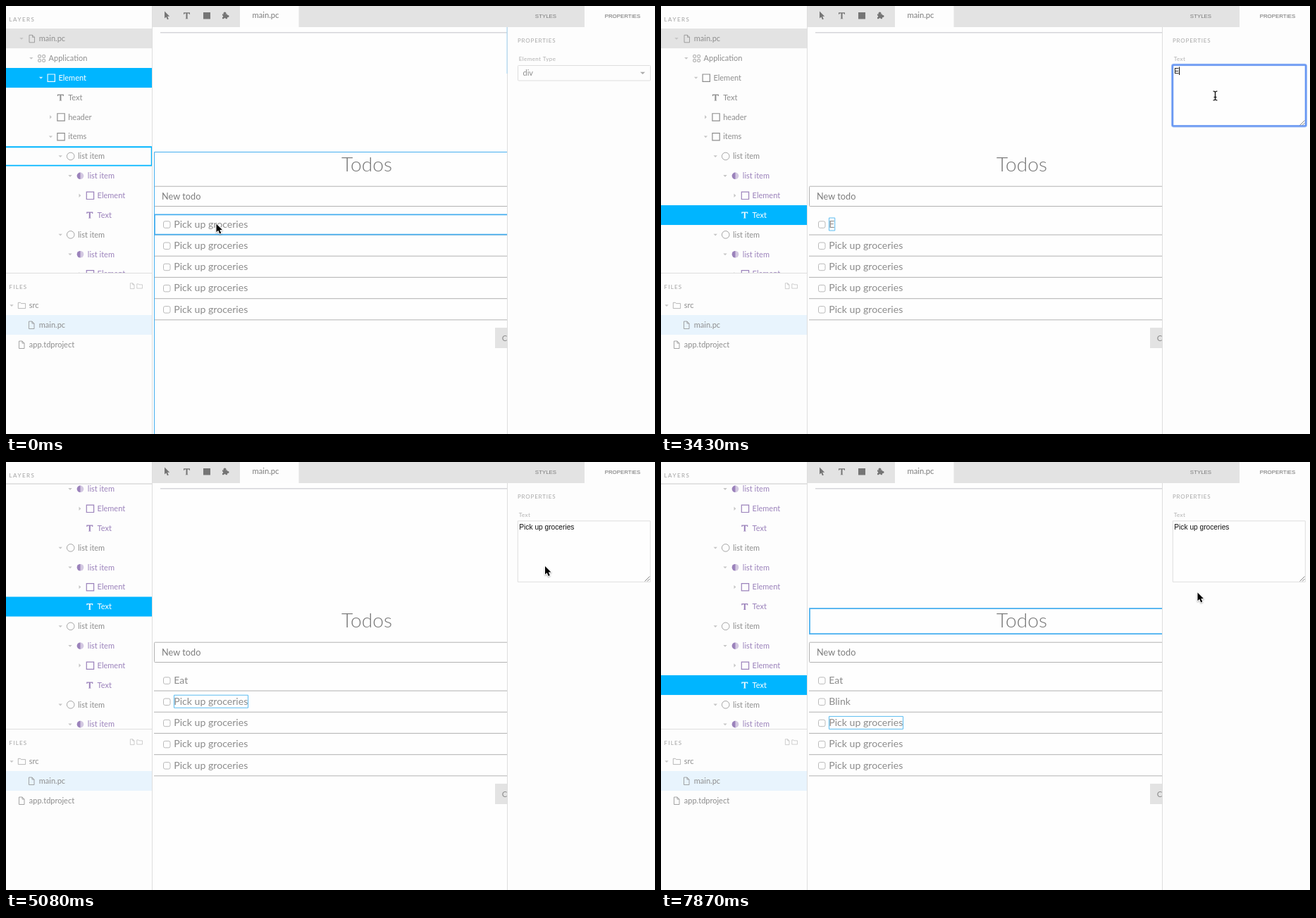
Animation of 921x608 px, one loop 8 s. Source, as an HTML page with a canvas:

```html
<!DOCTYPE html>
<html lang="en">
<head>
<meta charset="utf-8">
<title>Todo editor</title>
<style>
html, body { margin: 0; width: 100%; height: 100%; overflow: hidden; background: #fefefe; }
canvas { display: block; }
</style>
</head>
<body>
<canvas id="stage" width="921" height="608"></canvas>
<script>
const ctx = document.getElementById('stage').getContext('2d');
const LOOP = 8000, SPLIT = 711, PITCH = 27.86, ITEM = 30.2;
const GREY = '#8e8e8e', PURPLE = '#9b82bb', PALE = '#c6c6c6', RULE = '#dedede';
const BAR = '#e3e3e3', BLUE = '#00b5ff', HOVER = '#45aeef', PAPER = '#fdfdfd';
const TODO = 'Pick up groceries';

// Each step changes some of the state; sel -1 is the whole element, hover is an item index or a name.
const steps = [
  [0, { sel: -1, hover: 0, x: 298.5, y: 309.5, beam: 0, edge: 1, focus: 0, mark: -1, caret: 0, scroll: 0, todos: [TODO, TODO] }],
  [620, { edge: 0 }],
  [980, { sel: 0 }],
  [1250, { x: 309, y: 303.5 }],
  [1400, { x: 350, y: 285, hover: null }],
  [1510, { x: 480, y: 230, hover: 'title' }],
  [1620, { x: 640, y: 172 }],
  [1720, { x: 762, y: 133, hover: null }],
  [1830, { x: 786.5, y: 127.5, beam: 1, focus: 1 }],
  [2030, { mark: 8 }],
  [2150, { mark: 0 }],
  [3430, { mark: -1, caret: 1, todos: ['E', TODO] }],
  [3610, { todos: ['Ea', TODO] }],
  [3720, { todos: ['Eat', TODO] }],
  [3840, { x: 420, y: 285, beam: 0 }],
  [3960, { x: 230, y: 346.5, hover: 1 }],
  [4080, { x: 242, y: 345 }],
  [4200, { x: 250, y: 343, caret: 0 }],
  [4310, { x: 254, y: 341 }],
  [4400, { sel: 1, focus: 0 }],
  [4480, { x: 275, y: 332 }],
  [4660, { x: 386, y: 282.5 }],
  [4810, { x: 570, y: 236, scroll: 203, hover: 'element' }],
  [4930, { x: 727, y: 181, hover: 'title' }],
  [5080, { x: 765, y: 148, hover: null }],
  [5200, { x: 775.5, y: 132.5, beam: 1, focus: 1 }],
  [5310, { mark: 8 }],
  [5430, { mark: 0 }],
  [5930, { mark: -1, caret: 1, todos: ['Eat', 'B'] }],
  [6040, { todos: ['Eat', 'Bl'] }],
  [6150, { todos: ['Eat', 'Bli'] }],
  [6260, { todos: ['Eat', 'Blin'] }],
  [6370, { todos: ['Eat', 'Blink'] }],
  [6480, { x: 690, y: 190, beam: 0 }],
  [6590, { x: 510, y: 285, hover: 'title' }],
  [6700, { x: 345, y: 353, hover: null }],
  [6810, { x: 306, y: 363, hover: 2, caret: 0 }],
  [6930, { x: 296, y: 366 }],
  [7280, { sel: 2, focus: 0 }],
  [7490, { x: 310, y: 362 }],
  [7600, { x: 370, y: 336 }],
  [7750, { x: 570, y: 255, hover: 'title' }],
  [7870, { x: 761.5, y: 185.5 }]
];

// Layer tree: depth, icon, label, arrow (v open, > closed), colour
const item = [
  [4, 'circle', 'list item', 'v', GREY],
  [5, 'half', 'list item', 'v', PURPLE],
  [6, 'box', 'Element', '>', PURPLE],
  [6, 'text', 'Text', '', PURPLE]
];
const layers = [
  [0, 'page', 'main.pc', 'v', GREY],
  [1, 'grid', 'Application', 'v', GREY],
  [2, 'box', 'Element', 'v', GREY],
  [3, 'text', 'Text', '', GREY],
  [3, 'box', 'header', '>', GREY],
  [3, 'box', 'items', 'v', GREY],
  ...item, ...item, ...item, ...item, ...item
];

function fill(x, y, w, h, color) {
  ctx.fillStyle = color;
  ctx.fillRect(x, y, w, h);
}
function box(x, y, w, h, color, width = 1, radius = 0) {
  ctx.strokeStyle = color;
  ctx.lineWidth = width;
  ctx.beginPath();
  ctx.roundRect(x, y, w, h, radius);
  ctx.stroke();
}
function path(points, color, close = true) {
  ctx.beginPath();
  points.forEach(([x, y]) => ctx.lineTo(x, y));
  if (close) {
    ctx.closePath();
    ctx.fillStyle = color;
    ctx.fill();
  } else {
    ctx.strokeStyle = color;
    ctx.stroke();
  }
}
function text(str, x, y, size, color, { face = 'Lato', space = 0, align = 'left', weight = 400 } = {}) {
  ctx.font = `${weight} ${size}px ${face}, sans-serif`;
  ctx.letterSpacing = space + 'px';
  ctx.textAlign = align;
  ctx.fillStyle = color;
  ctx.fillText(str, x, y);
  return ctx.measureText(str).width;
}
function clip(x, y, w, h, draw) {
  ctx.save();
  ctx.beginPath();
  ctx.rect(x, y, w, h);
  ctx.clip();
  draw();
  ctx.restore();
}
function disc(x, y, r, color, from = 0, to = 7) {
  ctx.beginPath();
  ctx.arc(x, y, r, from, to);
  ctx.fillStyle = color;
  ctx.fill();
}

function arrow(x, y, dir, color) {
  path(dir === 'v'
    ? [[x - 2.7, y - 1.2], [x + 2.7, y - 1.2], [x, y + 1.6]]
    : [[x - 1.3, y - 2.7], [x - 1.3, y + 2.7], [x + 1.5, y]], color);
}
function bigT(x, y, color) {
  path([[-4.5, -4.5], [4.5, -4.5], [4.5, -2], [3.6, -2], [3, -3.2], [1, -3.2], [1, 3.8], [2.2, 4.5],
    [-2.2, 4.5], [-1, 3.8], [-1, -3.2], [-3, -3.2], [-3.6, -2], [-4.5, -2]]
    .map(([a, b]) => [x + a, y + b]), color);
}
const icons = {
  page(x, y, color) {
    ctx.lineWidth = 0.8;
    path([[x - 3.5, y - 5], [x + 1, y - 5], [x + 4, y - 2], [x + 4, y + 5.5], [x - 3.5, y + 5.5], [x - 3.5, y - 5]], color, false);
    path([[x + 1, y - 5], [x + 1, y - 2], [x + 4, y - 2]], color, false);
  },
  folder(x, y, color) {
    ctx.lineWidth = 0.8;
    path([[x - 5, y - 4], [x - 1.8, y - 4], [x - 0.8, y - 2.7], [x + 5.3, y - 2.7], [x + 5.3, y + 4.3], [x - 5, y + 4.3], [x - 5, y - 4]], color, false);
  },
  grid(x, y, color) {
    for (const dx of [-4.5, 1.5]) for (const dy of [-4.5, 1.5]) box(x + dx, y + dy, 3.6, 3.6, color, 0.8, 0.5);
  },
  box: (x, y, color) => box(x - 5, y - 5, 10.3, 10.3, color, 1.2),
  text: bigT,
  circle: (x, y, color) => box(x - 5.3, y - 5.3, 10.6, 10.6, color, 0.8, 5.3),
  half(x, y, color) {
    disc(x, y, 4.8, '#d3c8e1');
    disc(x, y, 4.8, color, Math.PI / 2, Math.PI * 1.5);
  }
};

function drawLayers(s) {
  const hot = typeof s.hover === 'number' ? 6 + 4 * s.hover : -1;
  const chosen = s.sel < 0 ? 2 : 9 + 4 * s.sel;
  fill(0, 0, 207, 608, PAPER);
  clip(0, 30, 208, 349, () => layers.forEach(([depth, icon, label, dir, tint], i) => {
    const y = 46.3 + PITCH * i - s.scroll, indent = 13.8 * depth, on = i === chosen;
    if (i === 0) fill(0, 32, 207, y - 18.2, BAR);
    if (on) fill(0, y - 14, 207.5, 28, BLUE);
    if (i === hot) box(-1, y - 13.2, 207.7, 26.4, BLUE, 1.8);
    const color = on ? '#fff' : tint;
    if (dir) arrow(22 + indent, y, dir, on ? '#d4f2ff' : PALE);
    icons[icon]((icon === 'text' ? 36 : 36.5) + indent, y, on ? '#e8f8ff' : color);
    text(label, 46.8 + indent, y + 3.8, 11, color);
  }));
  text('LAYERS', 4.5, 22, 8, '#a2a2a2', { space: 1.5 });
}

function drawFiles() {
  fill(0, 379, 207, 1, RULE);
  text('FILES', 4.5, 401.5, 8, '#a2a2a2', { space: 1.2 });
  ctx.save();
  ctx.translate(179, 397.5);
  ctx.scale(0.75, 0.75);
  icons.page(0, 0, '#b0b0b0');
  icons.folder(14, 0.5, '#b0b0b0');
  ctx.restore();
  fill(0, 439, 207, 28, '#e8f4fd');
  arrow(8, 425.5, 'v', PALE);
  icons.folder(22.3, 425.3, '#a8a8a8');
  text('src', 32.8, 429, 11, GREY);
  icons.page(36, 453, GREY);
  text('main.pc', 46.8, 457, 11, GREY);
  icons.page(22, 481, GREY);
  text('app.tdproject', 32.8, 485, 11, GREY);
  fill(207, 0, 1, 608, RULE);
}

function drawToolbar() {
  const ink = '#757575';
  fill(208, 0, 613, 30, BAR);
  fill(332, 0, 83.5, 30, PAPER);
  path(pointer.map(([a, b]) => [225 + a * 0.85, 7.5 + b * 0.85]), ink);
  bigT(256.5, 13.7, ink);
  fill(280, 9, 10, 9.5, ink);
  fill(307, 11.5, 7, 6.7, ink);
  disc(310.5, 10.3, 1.9, ink);
  disc(314.7, 14.5, 1.8, ink);
  disc(307, 14.8, 1.2, BAR);
  disc(310.5, 18.2, 1.2, BAR);
  text('main.pc', 349.5, 17.3, 11.2, '#7c7c7c');
}

function drawCanvas(s) {
  clip(208, 30, SPLIT - 208, 578, () => {
    fill(219, 37, 500, 1.5, '#d6d6da');
    text('Todos', 512, 235, 28.2, '#787878', { align: 'center', weight: 300 });
    box(210.5, 256.2, 520, 28.3, '#b2b2b2', 1, 1);
    text('New todo', 221, 275.4, 12.7, '#7c7c7c');
    for (let n = 0; n < 5; n++) {
      const y = 310.3 + ITEM * n, label = s.todos[n] || TODO;
      box(223.5, y - 4.5, 9.5, 9.5, '#bababa', 1, 2.2);
      const width = text(label, 238.3, y + 4.5, 14.1, '#8c8c8c');
      fill(210, y + 14.2, 510, 1.1, '#b8b8b8');
      if (n === s.sel) box(238.5, y - 9.3, width + 0.1, 18, '#5bbcf0');
      if (n === s.hover) box(211, y - 13.9, 520, 28.2, HOVER, 1.7);
    }
    fill(694, 457, 30, 29, BAR);
    text('Clear completed', 703.7, 476, 11.5, '#8c8c8c');
    if (s.sel < 0) box(210.5, 207.5, 520, 420, HOVER);
    if (s.hover === 'element') box(211, 208, 520, 420, HOVER, 1.7);
    if (s.hover === 'title') box(211, 208.2, 520, 35.9, HOVER, 1.7);
  });
}

function drawProperties(s) {
  fill(SPLIT, 30, 210, 578, PAPER);
  fill(821, 0, 100, 30, PAPER);
  fill(SPLIT, 30, 1, 578, RULE);
  if (s.edge) fill(SPLIT - 0.5, 30, 1, 66, '#a3d7f6');
  const arial = { face: 'Liberation Sans' };
  text('STYLES', 766, 17.3, 7.9, '#7a7a7a', { ...arial, align: 'center' });
  text('PROPERTIES', 875, 17.3, 7.9, '#6c6c6c', { ...arial, align: 'center' });
  text('PROPERTIES', 726, 52.3, 8, '#a8a8a8', { space: 0.8 });
  const isText = s.sel >= 0;
  text(isText ? 'Text' : 'Element Type', 727.8, 77.6, 8, '#b0b0b0', { space: 0.4 });
  if (!isText) {
    box(726.5, 84.5, 188, 21.5, RULE, 1, 1);
    text('div', 733.5, 99, 11, GREY);
    path([[900, 93.7], [907, 93.7], [903.5, 97]], '#aaa');
    return;
  }
  fill(726, 84, 189, 87, '#fefefe');
  if (s.focus) {
    box(725.7, 83.5, 189.6, 87.3, '#a9c5f8', 3.6, 2);
    box(725.9, 83.7, 189.2, 86.9, '#6695f2', 2, 1.5);
  } else {
    box(726.3, 83.8, 188, 86.5, RULE);
  }
  ctx.lineWidth = 0.9;
  for (const d of [7, 3.5]) path([[913.5 - d, 169.5], [913.5, 169.5 - d]], '#777', false);

  const value = s.todos[s.sel] || TODO;
  ctx.font = '10.2px "Liberation Sans", sans-serif';
  ctx.letterSpacing = '0px';
  const widthOf = str => ctx.measureText(str).width;
  if (s.mark >= 0) {
    const start = widthOf(value.slice(0, s.mark));
    fill(728.3 + start, 86, widthOf(value) - start, 12, '#b3d7fe');
  }
  const width = text(value, 728.3, 96, 10.2, '#111', arial);
  if (s.caret) fill(728.3 + width, 86.5, 1, 11.5, '#000');
}

const pointer = [[0, 0], [0, 11.8], [2.7, 9.3], [4.7, 13.9], [6.8, 13], [4.8, 8.6], [8.5, 8.4]];

function drawCursor({ x, y, beam }) {
  if (beam) {
    for (const [color, width] of [['#fff', 2.6], ['#111', 1.2]]) {
      ctx.lineWidth = width;
      for (const side of [-1, 1]) {
        path([[x + 3 * side, y - 6.5], [x + side, y - 6.2], [x, y - 5], [x, y + 5], [x + side, y + 6.2], [x + 3 * side, y + 6.5]], color, false);
      }
      path([[x - 2, y + 2], [x + 2, y + 2]], color, false);
    }
    return;
  }
  const shape = pointer.map(([a, b]) => [x + a, y + b]);
  ctx.save();
  ctx.shadowColor = 'rgba(0,0,0,.3)';
  ctx.shadowBlur = 2;
  ctx.shadowOffsetY = 1;
  ctx.lineWidth = 2;
  ctx.lineJoin = 'round';
  path([...shape, shape[0]], '#fff', false);
  ctx.restore();
  path(shape, '#000');
}

function draw(now) {
  const t = now % LOOP, s = {};
  for (const [at, change] of steps) if (at <= t) Object.assign(s, change);
  fill(0, 0, 921, 608, '#fefefe');
  drawCanvas(s);
  drawLayers(s);
  drawFiles();
  drawToolbar();
  drawProperties(s);
  drawCursor(s);
}

const begin = performance.now();
function frame() {
  draw(performance.now() - begin);
  requestAnimationFrame(frame);
}
frame();
</script>
</body>
</html>
```
